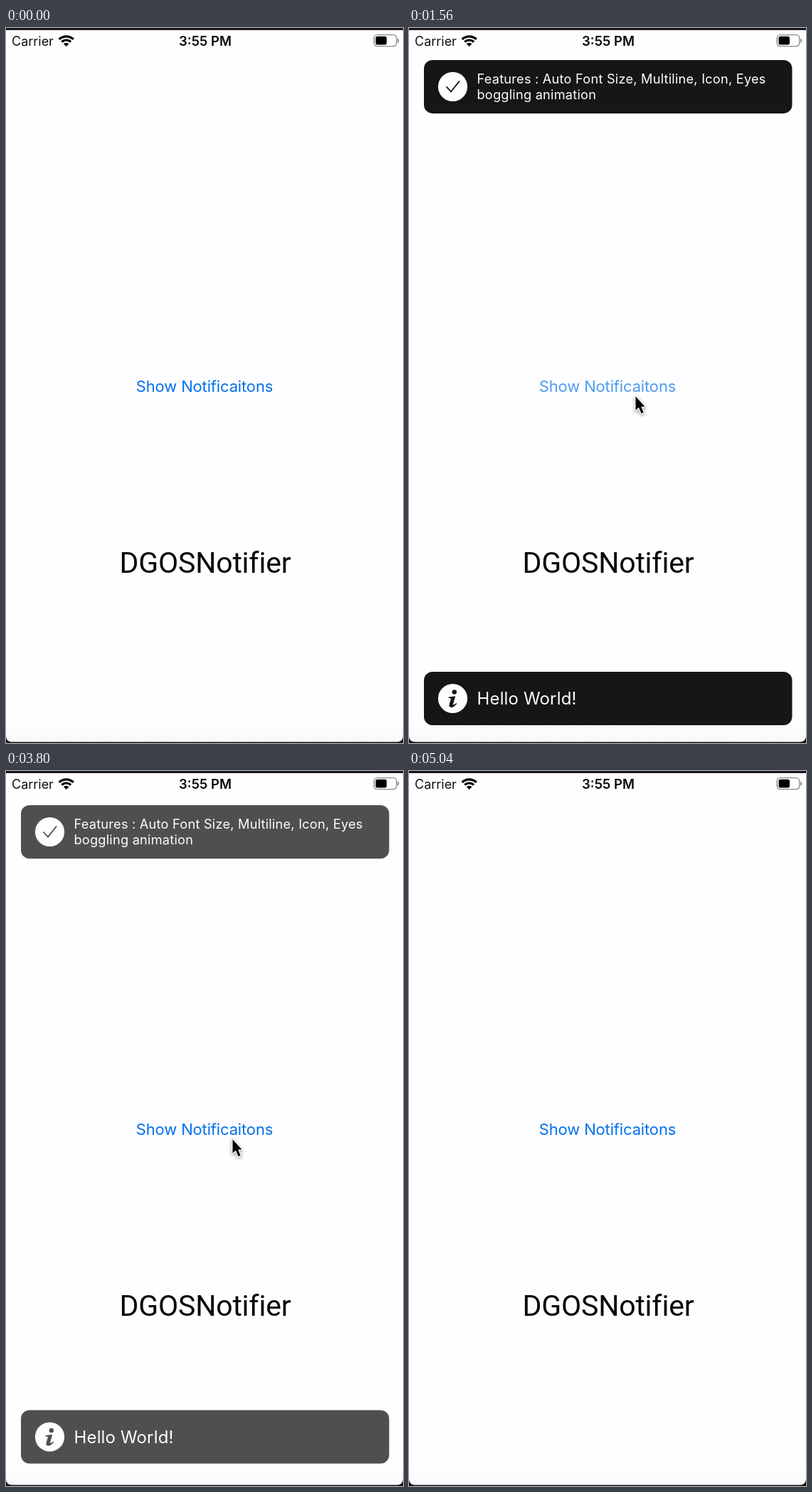
Animation of 558 by 1004 pixels, one loop 5280 ms. Source, as an HTML page with a canvas:

```html
<!DOCTYPE html>
<html lang="en">
<head>
<meta charset="utf-8">
<title>DGOSNotifier</title>
<style>
html, body { margin: 0; width: 100%; height: 100%; overflow: hidden; background: #fefdff; }
canvas { display: block; width: 558px; height: 1004px; }
</style>
</head>
<body>
<canvas id="stage" width="558" height="1004"></canvas>
<script>
const ctx = document.getElementById('stage').getContext('2d');
const LOOP = 5280, STEP = 40, BG = 254, PAPER = '#fefdff';
const SANS = 'Inter, "Liberation Sans", sans-serif';

const clamp = v => Math.max(0, Math.min(1, v));
const mix = (a, b, u) => a + (b - a) * u;
const span = (t, from, to) => clamp((t - from) / (to - from));

function text(str, x, y, font, color, spacing = 0, align = 'left') {
  ctx.font = font;
  ctx.letterSpacing = spacing + 'px';
  ctx.textAlign = align;
  ctx.fillStyle = color;
  ctx.fillText(str, x, y);
}

function box(x, y, w, h, r) {
  ctx.beginPath();
  ctx.roundRect(x, y, w, h, r);
}

function poly(points) {
  ctx.beginPath();
  points.forEach(([x, y]) => ctx.lineTo(x, y));
}

function disc(x, y, r, color) {
  ctx.beginPath();
  ctx.arc(x, y, r, 0, Math.PI * 2);
  ctx.fillStyle = color;
  ctx.fill();
}

function drawScreen() {
  ctx.fillStyle = '#1c151c';
  ctx.fillRect(0, 0, 558, 1004);
  const g = ctx.createLinearGradient(0, 975, 0, 1003);
  g.addColorStop(0, PAPER);
  g.addColorStop(1, '#f9f8fa');
  ctx.fillStyle = g;
  box(0, 3, 558, 999.5, [0, 0, 8, 8]);
  ctx.fill();
}

function drawStatus() {
  text('Carrier', 8, 25, '18px ' + SANS, '#111');
  text('3:55 PM', 280, 25, '600 18.5px ' + SANS, '#0a0a0a', 0, 'center');

  // wifi
  ctx.strokeStyle = ctx.fillStyle = '#000';
  ctx.lineWidth = 3.2;
  const a = -Math.PI * 0.75, b = -Math.PI * 0.25;
  for (const r of [14.2, 9]) {
    ctx.beginPath();
    ctx.arc(84.7, 26, r, a, b);
    ctx.stroke();
  }
  ctx.beginPath();
  ctx.moveTo(84.7, 26);
  ctx.arc(84.7, 26, 5.3, a, b);
  ctx.fill();

  // battery
  ctx.strokeStyle = ctx.fillStyle = '#8b898b';
  ctx.lineWidth = 1.4;
  box(517.3, 9.6, 31.6, 16, 4.5);
  ctx.stroke();
  box(550.3, 15, 2, 5.5, [0, 2, 2, 0]);
  ctx.fill();
  ctx.fillStyle = '#000';
  box(519.5, 11.8, 15.5, 11.6, 2.5);
  ctx.fill();
}

function drawCard(y, alpha, icon, lines, size, first, gap, spacing) {
  const v = Math.round(mix(BG, 0, alpha)), ink = `rgb(${v},${v},${v})`;
  ctx.save();
  ctx.translate(0, y);
  ctx.fillStyle = ink;
  box(21, 0, 517.5, 75, 12);
  ctx.fill();
  disc(61.5, 37.5, 20.6, PAPER);
  icon(ink);
  lines.forEach((s, i) =>
    text(s, 95.5, first + i * gap, size + 'px ' + SANS, PAPER, spacing));
  ctx.restore();
}

function checkIcon(ink) {
  ctx.strokeStyle = ink;
  ctx.lineWidth = 1.8;
  poly([[52.5, 37.5], [59, 44.5], [71, 29.5]]);
  ctx.stroke();
}

function infoIcon(ink) {
  disc(63.8, 28.4, 3.2, ink);
  ctx.beginPath();
  ctx.moveTo(55.5, 35.6);
  ctx.lineTo(65.2, 34.2);
  ctx.lineTo(62, 45.6);
  ctx.quadraticCurveTo(62.2, 47.6, 66.4, 44);
  ctx.lineTo(67.3, 44.8);
  ctx.quadraticCurveTo(62.5, 50.6, 59, 50);
  ctx.quadraticCurveTo(55.4, 49.4, 56.8, 45);
  ctx.lineTo(58.8, 38.4);
  ctx.quadraticCurveTo(59, 36.6, 55.4, 36.8);
  ctx.closePath();
  ctx.fill();
}

function drawCards(t) {
  if (t < 1480 || t >= 4040) return;
  const rest = Math.pow(clamp((1619 - t) / 214), 1.9);
  const alpha = t < 3800 ? 1 - rest : Math.pow((4040 - t) / 291.6, 1.9);
  drawCard(48 - 36 * rest, alpha, checkIcon,
    ['Features : Auto Font Size, Multiline, Icon, Eyes', 'boggling animation'],
    18.2, 33, 22.3, 0.22);
  drawCard(897.5 + 75 * rest, alpha, infoIcon, ['Hello World!'], 24, 46.5, 0, 0.15);
}

function buttonAlpha(t) {
  if (t < 1480) return 1 - 0.8 * span(t, 960, 1160);
  return 1 - 0.8 * Math.pow(clamp((2000 - t) / 560), 4);
}

function cursorAt(t) {
  if (t < 320 || t >= 4400) return null;
  if (t < 4280) {
    const left = Math.pow(1 - span(t, 320, 800), 2);
    return [318.5 + 207 * left, 520 + 225 * left - 2.8 * span(t, 880, 960)];
  }
  const u = Math.pow(span(t, 4240, 4360), 1.5);
  return [mix(318.5, 511, u), mix(517.2, 0, u)];
}

function drawCursor(t) {
  const p = cursorAt(t);
  if (!p) return;
  ctx.save();
  ctx.translate(p[0], p[1]);
  poly([[0, 0], [0, 19.6], [4.4, 15.6], [8, 24], [11.2, 22.6], [7.7, 14.5], [13, 14.2]]);
  ctx.closePath();
  ctx.lineJoin = 'round';
  ctx.lineWidth = 2.6;
  ctx.strokeStyle = '#fff';
  ctx.shadowColor = 'rgba(0,0,0,.45)';
  ctx.shadowBlur = 4;
  ctx.shadowOffsetY = 1.5;
  ctx.stroke();
  ctx.shadowColor = 'transparent';
  ctx.fillStyle = '#000';
  ctx.fill();
  ctx.restore();
}

function draw(t) {
  drawScreen();
  drawStatus();
  ctx.globalAlpha = buttonAlpha(t);
  text('Show Notificaitons', 279, 511, '22px ' + SANS, '#0071e9', -0.15, 'center');
  ctx.globalAlpha = 1;
  text('DGOSNotifier', 280, 764.5, '41px Roboto, "Noto Sans", sans-serif', '#080808', -0.2, 'center');
  drawCards(t);
  drawCursor(t);
}

const start = performance.now();
function tick() {
  const t = (performance.now() - start) % LOOP;
  draw(Math.floor(t / STEP) * STEP);
  requestAnimationFrame(tick);
}
tick();
</script>
</body>
</html>
```
